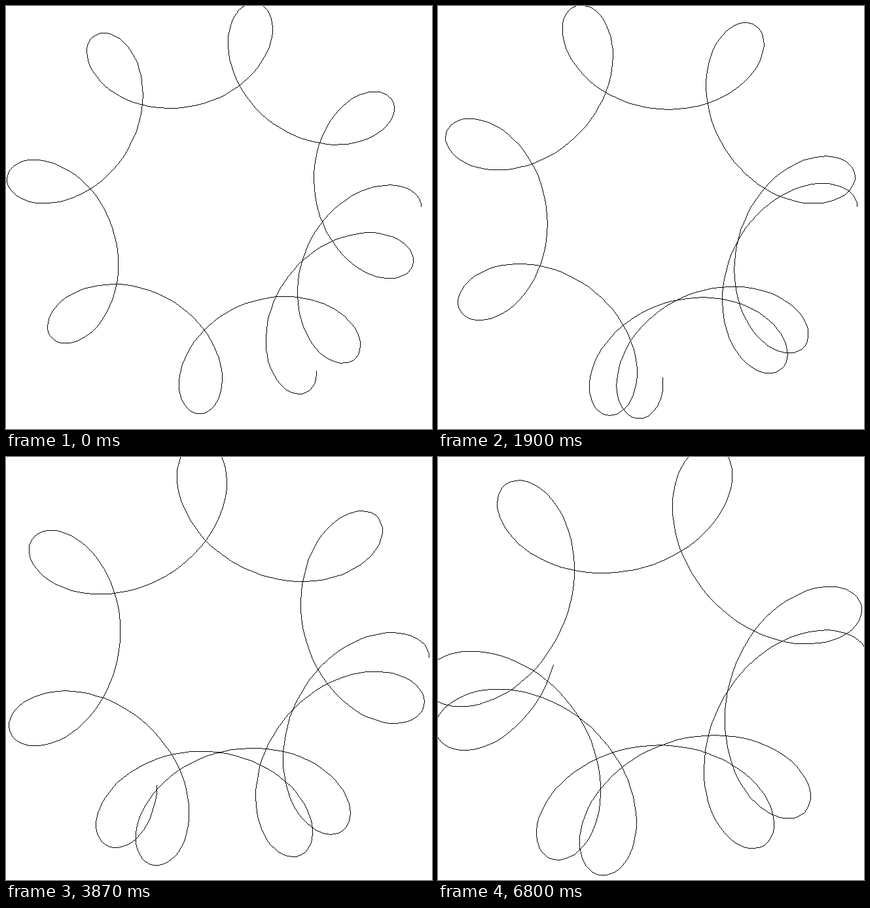
An HTML page with a canvas that plays this animation: 651x647 px, repeating every 6.85 s.

```html
<!DOCTYPE html>
<html lang="en">
<head>
<meta charset="utf-8">
<title>Trochoid</title>
<style>
  html, body { margin: 0; width: 100%; height: 100%; overflow: hidden; background: #fff; }
  canvas { display: block; width: 651px; height: 647px; image-rendering: pixelated; }
</style>
</head>
<body>
<canvas id="stage" width="651" height="647"></canvas>
<script>
const ctx = document.getElementById('stage').getContext('2d');
const LOOP = 6850;
const CENTER = { x: 316, y: 306.2 };
const ORBIT = 237.3;
const POINTS = 500;

// Key points of the uneven tempo: [step, start time in ms]
const TEMPO = [[0, 0], [1, 60], [13, 1140], [34, 3090], [61, 5700], [73, 6800], [74, LOOP]];

function stepAt(ms) {
  const i = TEMPO.findIndex(([, time]) => time > ms);
  const [s0, t0] = TEMPO[i - 1];
  const [s1, t1] = TEMPO[i];
  return Math.floor(s0 + (s1 - s0) * (ms - t0) / (t1 - t0) + 1e-6);
}

// One-pixel line without smoothing
function line(x0, y0, x1, y1) {
  const n = Math.max(Math.abs(x1 - x0), Math.abs(y1 - y0), 1);
  for (let i = 0; i <= n; i++) {
    ctx.fillRect(Math.round(x0 + (x1 - x0) * i / n), Math.round(y0 + (y1 - y0) * i / n), 1, 1);
  }
}

// The arm grows with the ratio of slow orbit to fast spin
function draw(step) {
  const ratio = 0.15029 + 0.0005578 * step;
  const arm = 536.5 * ratio;
  const point = i => {
    const spin = i / 10;
    const turn = spin * ratio;
    return [
      Math.round(CENTER.x + ORBIT * Math.cos(turn) + arm * Math.cos(spin)),
      Math.round(CENTER.y + ORBIT * Math.sin(turn) - arm * Math.sin(spin))
    ];
  };
  ctx.fillStyle = '#fff';
  ctx.fillRect(0, 0, 651, 647);
  ctx.fillStyle = '#000';
  let last = point(0);
  for (let i = 1; i < POINTS; i++) {
    const next = point(i);
    line(...last, ...next);
    last = next;
  }
}

const start = performance.now();
let shown = -1;

function tick() {
  const step = stepAt((performance.now() - start) % LOOP);
  if (step !== shown) draw(shown = step);
  requestAnimationFrame(tick);
}
tick();
</script>
</body>
</html>
```
